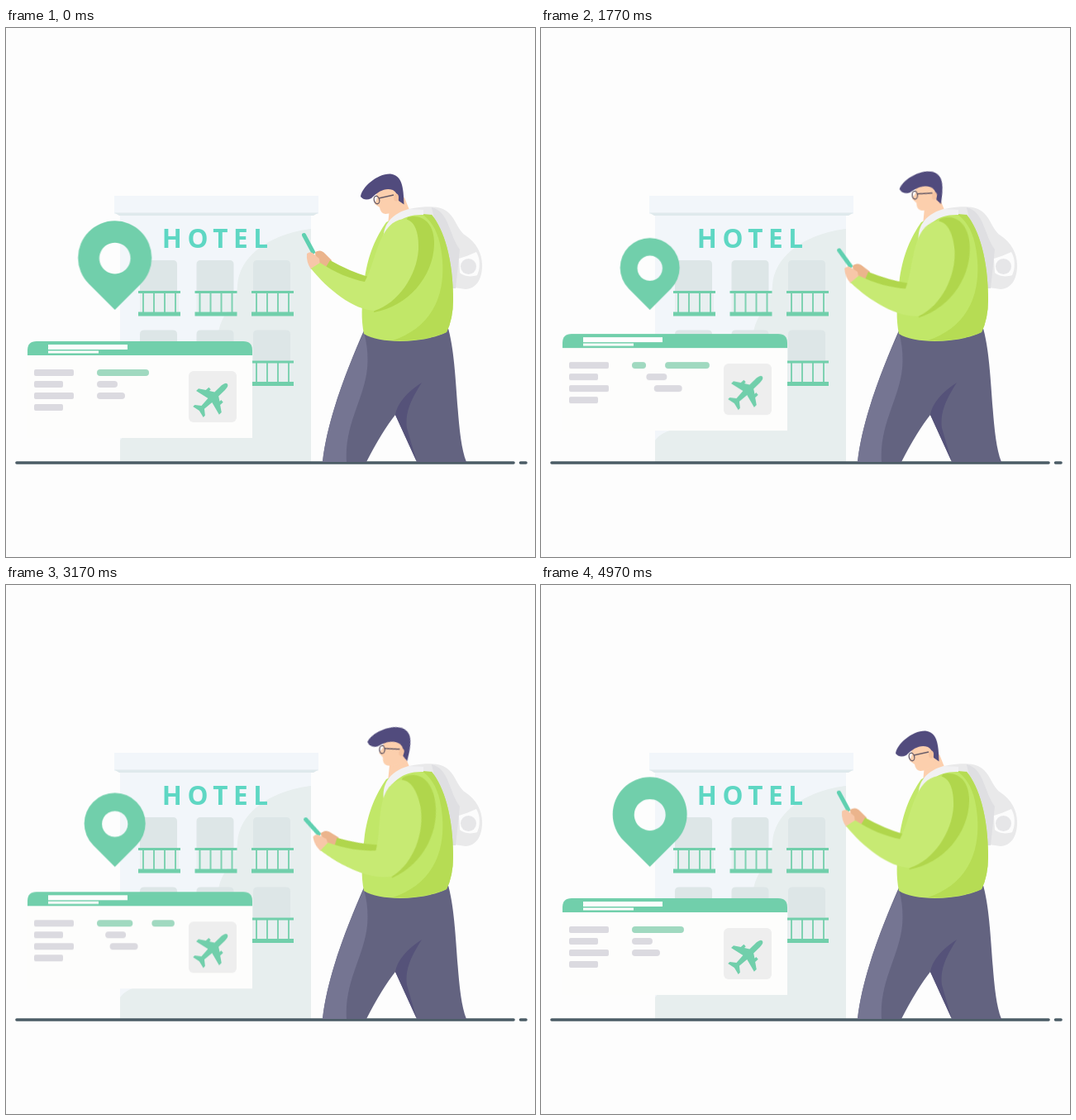
These frames come from a looping animation (640 by 640 pixels, 5010 ms). An HTML page without scripts:

```html
<!DOCTYPE html>
<html lang="en">
<head>
<meta charset="utf-8">
<title>Hotel booking</title>
<style>
html, body { margin: 0; width: 100%; height: 100%; overflow: hidden; background: #fdfdfd; }
svg { display: block; width: 100vw; height: 100vh; }

.sign { font: 700 31.5px "Open Sans", "Noto Sans", sans-serif; letter-spacing: 6.6px; fill: #5ed7c3; }
.mint { fill: #71cfab; }
.gray { fill: #dbdae0; }
.skin { fill: #fccfad; }

.card { animation: float 1252.5ms cubic-bezier(.37, 0, .63, 1) infinite alternate; }
.pin {
  transform-origin: 131.7px 341px;
  animation: pulse 626.25ms cubic-bezier(.37, 0, .63, 1) -98ms infinite alternate;
}
.run {
  fill: none; stroke: #dbdae0; stroke-width: 8; stroke-linecap: round;
  animation: run 5010ms cubic-bezier(.59, 0, .64, 1) infinite;
}
.arm { transform-origin: 500px 258px; animation: arm 5010ms linear infinite; }
.head { transform-origin: 485px 228px; animation: head 5010ms linear infinite; }

@keyframes float { to { transform: translateY(-14px); } }
@keyframes pulse { from { transform: scale(1.003); } to { transform: scale(.8); } }
@keyframes run { from { stroke-dashoffset: 0; } to { stroke-dashoffset: var(--end); } }
@keyframes arm {
  0% { transform: rotate(0deg); }
  22% { transform: rotate(0deg); animation-timing-function: ease-in-out; }
  49.5% { transform: rotate(-16deg); }
  53% { transform: rotate(-16deg); animation-timing-function: cubic-bezier(.3, 0, .8, .8); }
  71.3% { transform: rotate(-10.9deg); }
  86.4% { transform: rotate(-5.1deg); }
  100% { transform: rotate(0deg); }
}
@keyframes head {
  0% { transform: rotate(0deg); }
  22% { transform: rotate(0deg); animation-timing-function: ease-in-out; }
  52% { transform: rotate(23.5deg); }
  54.5% { transform: rotate(23.5deg); animation-timing-function: cubic-bezier(.35, 0, .65, .85); }
  71.3% { transform: rotate(6.3deg); }
  86.4% { transform: rotate(2.2deg); }
  100% { transform: rotate(0deg); }
}
</style>
</head>
<body>
<svg viewBox="0 0 640 640">
  <defs>
    <g id="window">
      <path d="M2 37V5q0-5 5-5H42q5 0 5 5V37Z" fill="#dde6e7"/>
      <path d="M2 40H49V62H2Z" fill="#e8eff0"/>
      <path d="M6 39V64M19 39V64M32 39V64M45 39V64" stroke="#7fd2b2" stroke-width="2"/>
      <path class="mint" d="M0 37H51V40H0ZM0 62.5H51V67.5H0Z"/>
    </g>
    <g id="row">
      <use href="#window"/>
      <use href="#window" x="68.5"/>
      <use href="#window" x="137"/>
    </g>
  </defs>

  <!-- building -->
  <path d="M138 225H369V525H138Z" fill="#f2f6fa"/>
  <path d="M369 243C330 247 282 270 280 312C279 338 256 345 256 380C256 450 205 480 172 483Q146 487 138 499V525H369Z" fill="#e7eeee"/>
  <path d="M131 203H378V225H131Z" fill="#f2f6fa"/>
  <path d="M131 223.5H378L372 227H137Z" fill="#dfe9ec"/>
  <text class="sign" x="188.8" y="266">HOTEL</text>
  <use href="#row" x="160" y="281"/>
  <use href="#row" x="160" y="365.5"/>

  <!-- map pin -->
  <path class="pin mint" fill-rule="evenodd" d="M131.700 341l-31.800-31.800a45 45 0 1 1 63.600 0ZM131.700 259a19 19 0 1 0 .1 0Z"/>

  <!-- ticket -->
  <g class="card">
    <path d="M26 395H298V496H26Z" fill="#fdfdfc"/>
    <path class="mint" d="M26 396V390q0-11 11-11H287q11 0 11 11V396Z"/>
    <path d="M51 383H147V389H51ZM51 390.500H112V393.500H51Z" fill="#fdfdfd"/>
    <g class="gray">
      <rect x="34" y="413" width="48" height="8" rx="2"/>
      <rect x="34" y="427" width="35" height="8" rx="2"/>
      <rect x="34" y="441" width="48" height="8" rx="2"/>
      <rect x="34" y="455" width="35" height="8" rx="2"/>
    </g>
    <path class="run" d="M114 417h85.900" stroke-dasharray="55 31" style="stroke:#a0d9c0;--end:-258px"/>
    <path class="run" d="M114 431h55.900" stroke-dasharray="17 39" style="--end:-112px"/>
    <path class="run" d="M114 445h85.900" stroke-dasharray="26 60" style="--end:-172px"/>
    <rect x="221" y="415" width="58" height="62" rx="6" fill="#eeeeee"/>
    <path class="mint" transform="translate(249 448.500) rotate(46)" d="M0-26C3-26 3.500-21 3.500-17V-8L9-4.500V-7H12.500V-2L20 3V7L3.500 3L2.500 15L9 20V23L0 21L-9 23V20L-2.500 15L-3.500 3L-20 7V3L-12.500-2V-7H-9V-4.500L-3.500-8V-17C-3.500-21-3-26 0-26Z"/>
  </g>

  <!-- ground -->
  <path d="M13 526H614M622.500 526H629" stroke="#4b5c66" stroke-width="3.600" stroke-linecap="round"/>

  <!-- backpack -->
  <path d="M474 223C490 217 515 214 526 218C544 224 544 243 556 251C570 260 577 275 576 290C575 305 569 315 556 316L535 313L510 235Z" fill="#e9e9ea"/>
  <path d="M515 217C536 222 536 250 549 268L544 315H535L520 240Z" fill="#dfdfe2"/>
  <path d="M548 279C555 277 562 274 569 271C574 279 574 291 570 299C562 302 553 300 549 296Z" fill="#fcfcfc"/>
  <circle cx="559.500" cy="288.500" r="9.500" fill="#e6e6e8"/>

  <!-- trousers -->
  <path d="M433 366C416 405 389 470 383 525H436Q455 488 471 468L497 525H557C543 490 548 405 534 360Z" fill="#636380"/>
  <path d="M433 368C416 405 389 470 383 525H412C409 480 433 450 437 412Q439 390 433 368Z" fill="#757592"/>
  <path d="M503 429C493 445 482 463 485 484L497 525L471 468C473 454 486 440 503 429Z" fill="#555279"/>

  <!-- jumper -->
  <path class="skin" d="M465 208L482 205L488 220L472 228L462 238Z"/>
  <path d="M460 235C473 228 490 224 515 226C530 244 541 280 541 328Q541 352 533 368C510 380 455 384 433 370C428 345 432 322 434 302C439 272 447 254 460 235Z" fill="#c1e768"/>
  <path d="M515 226C530 244 541 280 541 328Q541 352 533 368C515 376 490 379 468 378C515 362 531 325 528 282C526 255 519 236 503 225Z" fill="#b6dc54"/>
  <path d="M457 259C455 243 462 226 487 219L505 220V226C480 225 465 238 457 259Z" fill="#f1f1f3"/>

  <!-- arm and phone -->
  <g class="arm">
    <path d="M360.500 250.500L371.500 271" stroke="#5fd0b0" stroke-width="5" stroke-linecap="round"/>
    <path d="M374 271Q381 267 386 273L394 281L389 291L375 286Z" fill="#ebb48c"/>
    <path d="M392 281Q415 294 438 301L446 312L420 311L386 291Z" fill="#b0d64c"/>
    <path d="M364 273Q369 269 373 274L379 279L380 288L369 292Q363 283 364 273Z" fill="#f7c7a8"/>
    <path d="M486 229C505 224 519 238 518 262C517 300 487 337 445 344L462 290Z" fill="#b0d64c"/>
    <path d="M369 291L380 284C398 296 418 304 434 307C447 285 450 240 476 232C493 227 500 245 499 268C497 300 474 333 446 342C420 341 389 316 369 291Z" fill="#c7ea73"/>
  </g>

  <!-- head -->
  <g class="head">
    <path class="skin" d="M447 196L474 190L481 210C477 218 470 224 459 225Q453 224 452 217L446 213L449 205Z"/>
    <path d="M429 204C430 193 449 176 465 176.500C479 178 481 192 481.500 213.500L475 209Q474 199 468 196C459 193 451 197 442 206Q434 210 429 204Z" fill="#514b7d"/>
    <path d="M451 206L469 202" stroke="#665a66" stroke-width="1.300"/>
    <ellipse cx="448.500" cy="208" rx="3.200" ry="4.800" transform="rotate(-14 448.500 208)" fill="none" stroke="#665a66" stroke-width="1.300"/>
    <ellipse cx="472" cy="205" rx="3" ry="4.500" fill="#f6c3a0"/>
  </g>
</svg>
</body>
</html>
```
